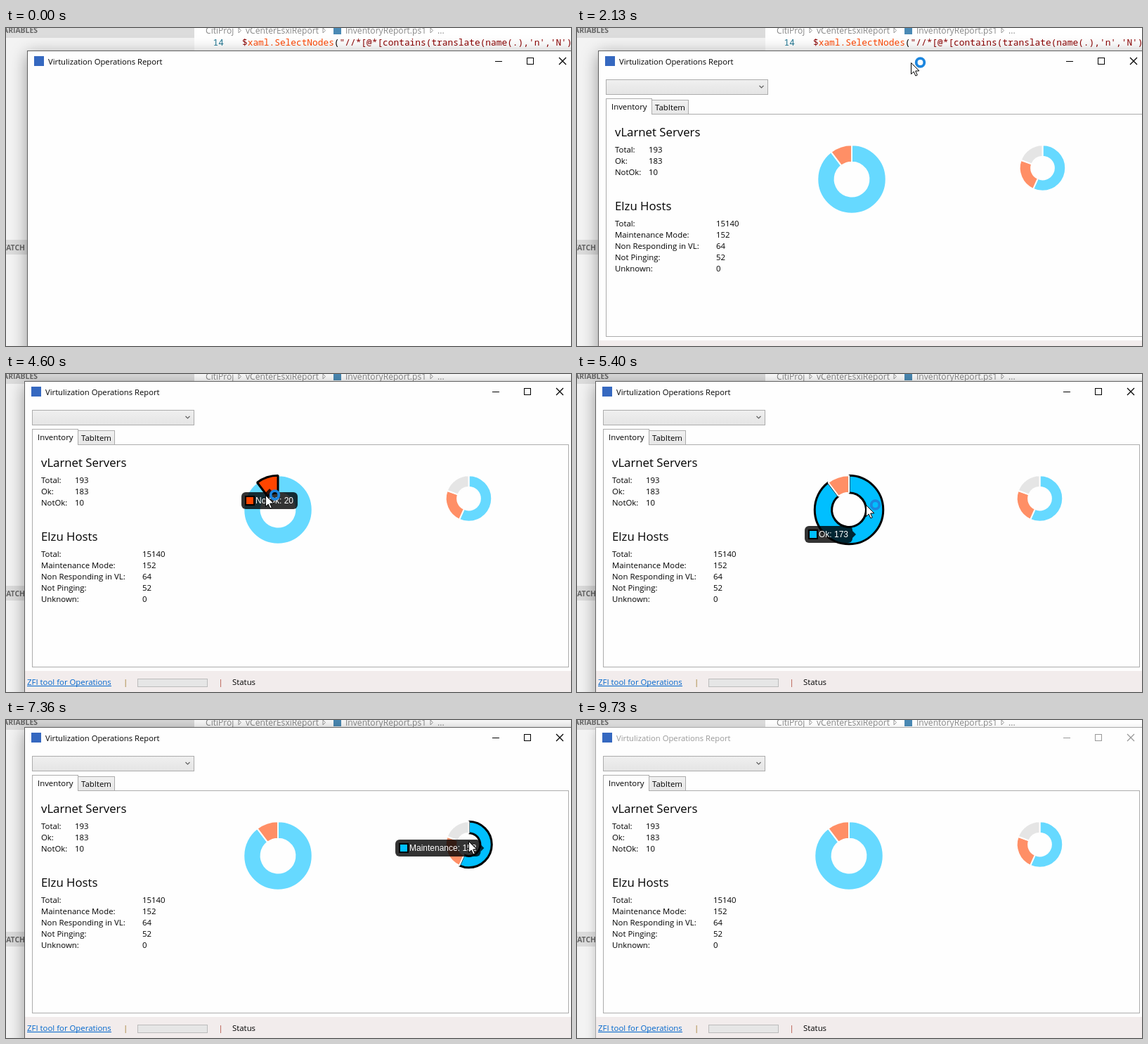
Animation of 804x452 px, one loop 9800 ms. Source, as an HTML page with a canvas:

```html
<!DOCTYPE html>
<html lang="en">
<head>
<meta charset="utf-8">
<title>Operations Report</title>
<style>
  html, body { margin: 0; width: 100%; height: 100%; overflow: hidden; background: #fff; }
  canvas { display: block; }
</style>
</head>
<body>
<canvas id="stage" width="804" height="452"></canvas>
<script>
const ctx = document.getElementById('stage').getContext('2d');
const LOOP = 9800, TAU = Math.PI * 2;
const UI = '"Open Sans", "Noto Sans", sans-serif';
const MONO = '12.83px "Noto Sans Mono", "DejaVu Sans Mono", monospace';
const BODY = '11.4px ' + UI, HEAD = '16.8px ' + UI, CRUMB = '12.1px ' + UI;
const TIP = '12px "Liberation Sans", Arial, sans-serif';
const EDGE = '#acacac', PAPER = '#fefefe';

// Pointer in window space: time, x, y and, where it changes, the slice under it
const poses = [
  [1400, 606, -20], [1760, 343, 176], [2130, 475, 49], [3060, 475, 49],
  [3500, 128, 142], [3960, 384, 234, 'Ok'], [4400, 380, 207, 'NotOk'],
  [4600, 373, 194], [4960, 382, 200, 'Ok'], [5900, 452, 218, ''],
  [6130, 614, 194, 'Maintenance'], [6230, 657, 182], [6530, 656, 182, 'Not Pinging'],
  [7060, 652, 186, 'Maintenance'], [7800, 676, 206, ''], [8340, 636, 214, 'Not Responding'],
  [8650, 641, 215, 'Maintenance'], [8760, 655, 228, ''], [9460, 747, 482]
];

const slice = (label, value, side, fill, hot) => ({ label, value, side, fill, hot });
const blue = ['#66d9ff', '#00bfff'], orange = ['#ff8f66', '#ff4500'], grey = ['#e5e5e5', '#d3d3d3'];
const charts = [
  { x: 391, y: 215, r: 48.75, slices: [
    slice('Ok', 173, 'left', ...blue),
    slice('NotOk', 20, 'below', ...orange)] },
  { x: 662.5, y: 199, r: 32.75, slices: [
    slice('Maintenance', 152, 'left', ...blue),
    slice('Not Responding', 64, 'above', ...orange),
    slice('Not Pinging', 52, 'below', ...grey)] }
];

const byLabel = {};
for (const c of charts) {
  const sum = c.slices.reduce((s, d) => s + d.value, 0);
  let from = 0;
  for (const d of c.slices) {
    Object.assign(d, { chart: c, from, sweep: d.value / sum * TAU });
    from += d.sweep;
    byLabel[d.label] = d;
  }
}
const hovers = poses.filter(p => p.length > 3).map(p => ({ at: p[0], slice: byLabel[p[3]] }));

const clamp = v => Math.max(0, Math.min(1, v));
const outQuart = v => 1 - Math.pow(1 - clamp(v), 4);
const mix = (a, b, k) => a + (b - a) * k;

function pointerAt(t) {
  const i = Math.max(1, poses.findIndex(p => p[0] > t));
  const a = poses[i - 1], b = poses[i];
  const k = clamp((t - a[0]) / (b[0] - a[0]));
  return [1, 2].map(n => Math.round(mix(a[n], b[n], k)));
}

function box(x, y, w, h, fill, line) {
  if (line) {
    ctx.fillStyle = line;
    ctx.fillRect(x, y, w, h);
    x++; y++; w -= 2; h -= 2;
  }
  ctx.fillStyle = fill;
  ctx.fillRect(x, y, w, h);
}

function text(s, x, y, font = BODY, color = '#000', align = 'left') {
  ctx.font = font;
  ctx.fillStyle = color;
  ctx.textAlign = align;
  ctx.fillText(s, x, y);
  return ctx.measureText(s).width;
}

function trace(points) {
  ctx.beginPath();
  points.forEach(([x, y]) => ctx.lineTo(x, y));
}

function line(points, color, width = 1) {
  trace(points);
  ctx.strokeStyle = color;
  ctx.lineWidth = width;
  ctx.stroke();
}

function shade(y, h, top, bottom) {
  const g = ctx.createLinearGradient(0, y, 0, y + h);
  g.addColorStop(0, top);
  g.addColorStop(1, bottom);
  return g;
}

function editor() {
  box(0, 0, 804, 452, '#fff');
  box(0, 0, 268, 452, '#f3f3f3');
  box(0, 0, 268, 14, '#dcdcdc');
  box(0, 301, 268, 21, '#dcdcdc');
  const bold = 'bold 10.4px ' + UI;
  text('VARIABLES', 45, 7, bold, '#666', 'right');
  text('WATCH', 27, 316, bold, '#666', 'right');

  text('CitiProj', 284, 8, CRUMB, '#888');
  text('vCenterEsxiReport', 341, 8, CRUMB, '#888');
  text('InventoryReport.ps1', 483, 8, CRUMB, '#888');
  text('...', 614, 8, CRUMB, '#888');
  for (const x of [331, 451, 604]) line([[x, 0], [x + 3.5, 3.5], [x, 7], [x, 0]], '#999');
  box(466, -2, 11, 11, '#4a8ab5');

  text('14', 294.5, 25, MONO, '#237893');
  let x = 336;
  x += text('$', x, 25, MONO, '#8b0000');
  x += text('xaml.SelectNodes', x, 25, MONO, '#ff4500');
  x += text('(', x, 25, MONO);
  text('"//*[@*[contains(translate(name(.),\'n\',\'N\')', x, 25, MONO, '#8b0000');
}

function frame(active) {
  ctx.save();
  ctx.shadowColor = active ? 'rgba(0,0,0,.38)' : 'rgba(0,0,0,.2)';
  ctx.shadowBlur = active ? 22 : 14;
  ctx.shadowOffsetY = 5;
  box(30, 32, 900, 600, active ? '#5f5f5f' : '#a8a8a8');
  ctx.restore();
  box(31, 33, 900, 600, PAPER);

  const ink = active ? '#000' : '#999';
  box(40, 40, 14, 14, '#3568c0');
  text('Virtulization Operations Report', 60, 52, '11.25px ' + UI, ink);
  box(696, 47, 10, 1, ink);
  ctx.strokeStyle = ink;
  ctx.lineWidth = 1;
  ctx.strokeRect(741.5, 42.5, 9, 9);
  line([[787, 42], [797, 52]], ink, 1.2);
  line([[797, 42], [787, 52]], ink, 1.2);
}

function rows(list, x, y) {
  list.forEach(([name, value], i) => {
    text(name, 54, y + i * 16);
    text(value, x, y + i * 16);
  });
}

function content() {
  box(41, 73, 231, 22, shade(73, 22, '#f0f0f0', '#e4e4e4'), EDGE);
  line([[259.5, 82], [262.5, 85], [265.5, 82]], '#606060', 1.2);

  box(41, 122, 764, 317, PAPER, EDGE);
  box(106, 102, 53, 21, shade(102, 21, '#f1f1f1', '#e6e6e6'), EDGE);
  box(41, 100, 66, 23, PAPER, EDGE);
  box(42, 121, 64, 3, PAPER);
  text('Inventory', 49, 116);
  text('TabItem', 111, 117);

  text('vLarnet Servers', 54, 154, HEAD);
  rows([['Total:', '193'], ['Ok:', '183'], ['NotOk:', '10']], 102, 177);
  text('Elzu Hosts', 54, 259, HEAD);
  rows([['Total:', '15140'], ['Maintenance Mode:', '152'], ['Non Responding in VL:', '64'],
    ['Not Pinging:', '52'], ['Unknown:', '0']], 198, 282);

  box(31, 444, 900, 190, '#f2ecec');
  const w = text('ZFI tool for Operations', 34, 464, BODY, '#0066cc');
  box(34, 465, Math.round(w), 1, '#0066cc');
  text('|', 171, 464, BODY, '#a07828');
  text('|', 306.5, 464, BODY, '#b04a3a');
  box(191, 455, 100, 12, '#e6e6e6', '#bcbcbc');
  text('Status', 326, 464);
}

function doughnut(c, grow, hot) {
  for (const d of c.slices) {
    const a = d.from * grow - TAU / 4, b = a + d.sweep * grow;
    ctx.beginPath();
    ctx.arc(c.x, c.y, c.r, a, b);
    ctx.arc(c.x, c.y, c.r / 2, b, a, true);
    ctx.closePath();
    ctx.lineJoin = 'bevel';
    ctx.fillStyle = d === hot ? d.hot : d.fill;
    ctx.fill();
    ctx.strokeStyle = d === hot ? '#000' : PAPER;
    ctx.lineWidth = d === hot ? 3 : 2;
    ctx.stroke();
  }
}

const caption = d => d.label + ': ' + d.value;

// Label box of a slice, hung on the middle of its ring segment
function place(d) {
  const { x, y, r } = d.chart, mid = d.from + d.sweep / 2;
  const px = x + Math.sin(mid) * r * 0.75, py = y - Math.cos(mid) * r * 0.75;
  ctx.font = TIP;
  const w = ctx.measureText(caption(d)).width + 26;
  if (d.side === 'left') return { w, x: px - w - 7, y: py - 12 };
  return { w, x: px - w / 2, y: d.side === 'below' ? py + 7 : py - 31 };
}

function tooltip(now, last, t) {
  const d = now.slice || last.slice;
  const k = outQuart((t - now.at) / 400);
  const moved = now.slice && last && last.slice;
  const alpha = !now.slice ? 1 - k : moved ? 1 : k;
  if (alpha < 0.01) return;

  let { w, x, y } = place(d);
  if (moved) {
    const old = place(last.slice);
    x = mix(old.x, x, k);
    y = mix(old.y, y, k);
  }
  x = Math.round(x);
  y = Math.round(y);
  ctx.save();
  ctx.globalAlpha = alpha;
  ctx.fillStyle = 'rgba(0,0,0,.8)';
  ctx.beginPath();
  ctx.roundRect(x, y, w, 24, 6);
  ctx.fill();
  const cx = x + w / 2, right = x + w;
  trace({
    left: [[right, y + 7], [right + 5, y + 12], [right, y + 17]],
    below: [[cx - 5, y], [cx, y - 5], [cx + 5, y]],
    above: [[cx - 5, y + 24], [cx, y + 29], [cx + 5, y + 24]]
  }[d.side]);
  ctx.fill();
  box(x + 5, y + 5, 14, 14, '#000');
  box(x + 7, y + 7, 10, 10, d.hot);
  text(caption(d), x + 20, y + 16, TIP, '#fff');
  ctx.restore();
}

function cursor(t) {
  const [x, y] = pointerAt(t);
  ctx.save();
  ctx.translate(x + 0.5, y + 0.5);
  trace([[0, 0], [0, 16], [3.7, 12.6], [6.4, 18.5], [8.8, 17.4], [6.2, 11.6], [11.4, 11.4]]);
  ctx.closePath();
  ctx.fillStyle = '#fff';
  ctx.fill();
  ctx.strokeStyle = '#000';
  ctx.lineWidth = 1;
  ctx.stroke();
  if (t < 6080) {
    ctx.beginPath();
    ctx.arc(13, -0.5, 5.8, 0, TAU);
    ctx.strokeStyle = '#1c86df';
    ctx.lineWidth = 3.8;
    ctx.stroke();
  }
  ctx.restore();
}

function draw(t) {
  editor();
  ctx.save();
  const pull = clamp((t - 2360) / 500);
  ctx.translate(Math.round(-4 * pull), Math.round(-22 * pull));
  frame(t < 9730);
  if (t >= 30) {
    content();
    const i = hovers.findLastIndex(h => t >= h.at), now = hovers[i];
    const grow = outQuart((t - 300) / 900);
    if (grow) charts.forEach(c => doughnut(c, grow, now && now.slice));
    if (now) tooltip(now, hovers[i - 1], t);
  }
  if (t >= 1400 && t < 9460) cursor(t);
  ctx.restore();
}

const start = performance.now();
function tick() {
  draw((performance.now() - start) % LOOP);
  requestAnimationFrame(tick);
}
tick();
</script>
</body>
</html>
```
